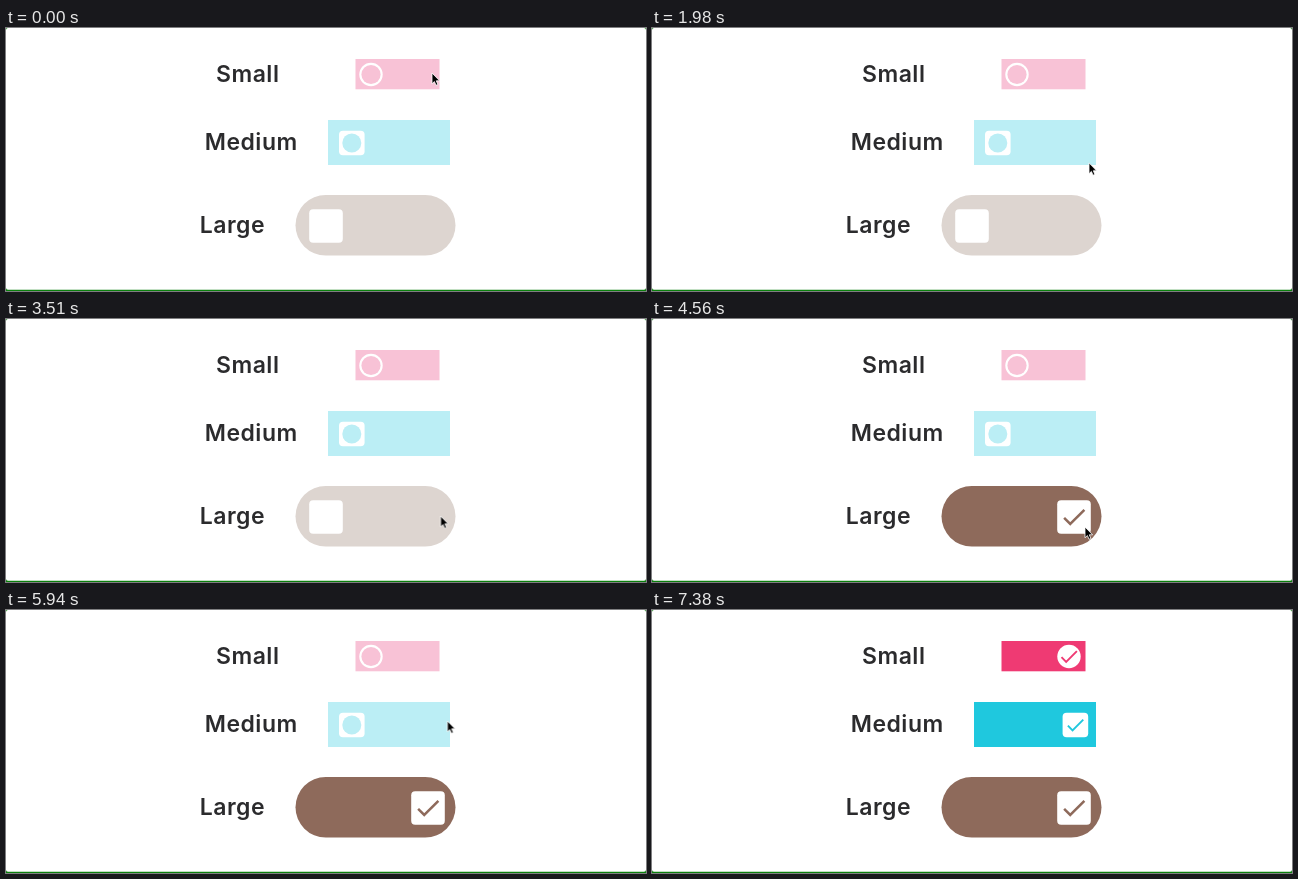
Animation, 640 px wide and 263 px high, one loop 7410 ms. Source, as an HTML page:

```html
<!DOCTYPE html>
<html lang="en">
<head>
<meta charset="utf-8">
<title>Rolling switches</title>
<style>
@property --v { syntax: "<number>"; inherits: true; initial-value: 0; }

html, body { margin: 0; width: 100%; height: 100%; overflow: hidden; background: #0a7f0c; }
svg { display: block; width: 640px; height: 263px; }

text {
  font: 600 23px Inter, "Liberation Sans", sans-serif;
  letter-spacing: .5px;
  text-anchor: middle;
  fill: #2b2b2d;
}

/* --v runs from 0 (off) to 1 (on) and drives knob and icons */
.switch { color: var(--off); animation: 7410ms ease-in-out infinite; }
.small  { --off: #f8c2d6; --on: #ef3a73; --x: 365px; --y: 46.5px; --travel: 52px; animation-name: small; }
.medium { --off: #bbeef5; --on: #1fc8de; --x: 345.8px; --y: 115px; --travel: 77.6px; animation-name: medium; }
.large  { --off: #ddd5d0; --on: #8e6a5b; --x: 320px; --y: 198px; --travel: 102px; animation-name: large; }

.track { fill: currentColor; }
.knob {
  fill: #fff;
  transform: translate(calc(var(--x) + var(--v) * var(--travel)), var(--y)) rotate(calc(var(--v) * 360deg));
}
.dot { fill: currentColor; opacity: calc(1 - var(--v)); }
.tick { fill: none; stroke: currentColor; stroke-width: 2; opacity: var(--v); }

@keyframes small {
  0%, 5.2%, 22.94%, 91.77% { --v: 0; color: var(--off); }
  10.59%, 17.54%, 97.17%, 100% { --v: 1; color: var(--on); }
}
@keyframes medium {
  0%, 31.11%, 44.8%, 84.8% { --v: 0; color: var(--off); }
  36.5%, 39.41%, 90.2%, 100% { --v: 1; color: var(--on); }
}
@keyframes large {
  0%, 51.15%, 67.07%, 71.66% { --v: 0; color: var(--off); }
  56.55%, 61.67%, 77.06%, 100% { --v: 1; color: var(--on); }
}

.cursor { stroke: #fff; stroke-width: .8; animation: pointer 7410ms ease-in-out infinite; }
@keyframes pointer {
  0% { transform: translate(426px, 45px); }
  17.4%, 22.3% { transform: translate(426px, 44px); }
  25.9% { transform: translate(440px, 137px); }
  27.7%, 39.8% { transform: translate(433px, 132px); }
  41.3% { transform: translate(442px, 147px); }
  49.9%, 62.1% { transform: translate(433px, 208px); }
  66.1% { transform: translate(448px, 211px); }
  70.2%, 73.1% { transform: translate(436px, 198px); }
  78.3% { transform: translate(445px, 145px); animation-timing-function: ease-out; }
  81.8% { transform: translate(440px, 98px); }
  85% { transform: translate(438px, 100px); }
  87.9%, 94% { transform: translate(427px, 47px); }
  99.5%, 100% { transform: translate(645px, 264px); }
}
</style>
</head>
<body>
<svg viewBox="0 0 640 263">
  <defs>
    <path id="check" d="M4.1 12.7 9 17.6 20.3 6.3" transform="translate(-12 -12)"/>
  </defs>
  <rect width="640" height="261.7" rx="2" fill="#fff"/>

  <text x="241.7" y="54">Small</text>
  <text x="245.2" y="122">Medium</text>
  <text x="226.4" y="205">Large</text>

  <g class="switch small">
    <rect class="track" x="349.5" y="31" width="84" height="30.3"/>
    <g class="knob">
      <circle r="11.7"/>
      <circle class="dot" r="9.6"/>
      <g class="tick"><use href="#check" transform="scale(.95)"/></g>
    </g>
  </g>

  <g class="switch medium">
    <rect class="track" x="322" y="92" width="122" height="45"/>
    <g class="knob">
      <rect x="-12.8" y="-12.3" width="25.6" height="24.6" rx="4"/>
      <circle class="dot" r="9.5"/>
      <g class="tick"><use href="#check" transform="scale(.95)"/></g>
    </g>
  </g>

  <g class="switch large">
    <rect class="track" x="289.5" y="167" width="160" height="60.5" rx="30.25"/>
    <g class="knob">
      <rect x="-16.8" y="-16.8" width="33.6" height="33.6" rx="4"/>
      <g class="tick"><use href="#check" transform="scale(1.25)"/></g>
    </g>
  </g>

  <path class="cursor" d="M0 0V10.8L2.4 8.5 4 12.3 5.9 11.5 4.3 7.8H7.6z"/>
</svg>
</body>
</html>
```
